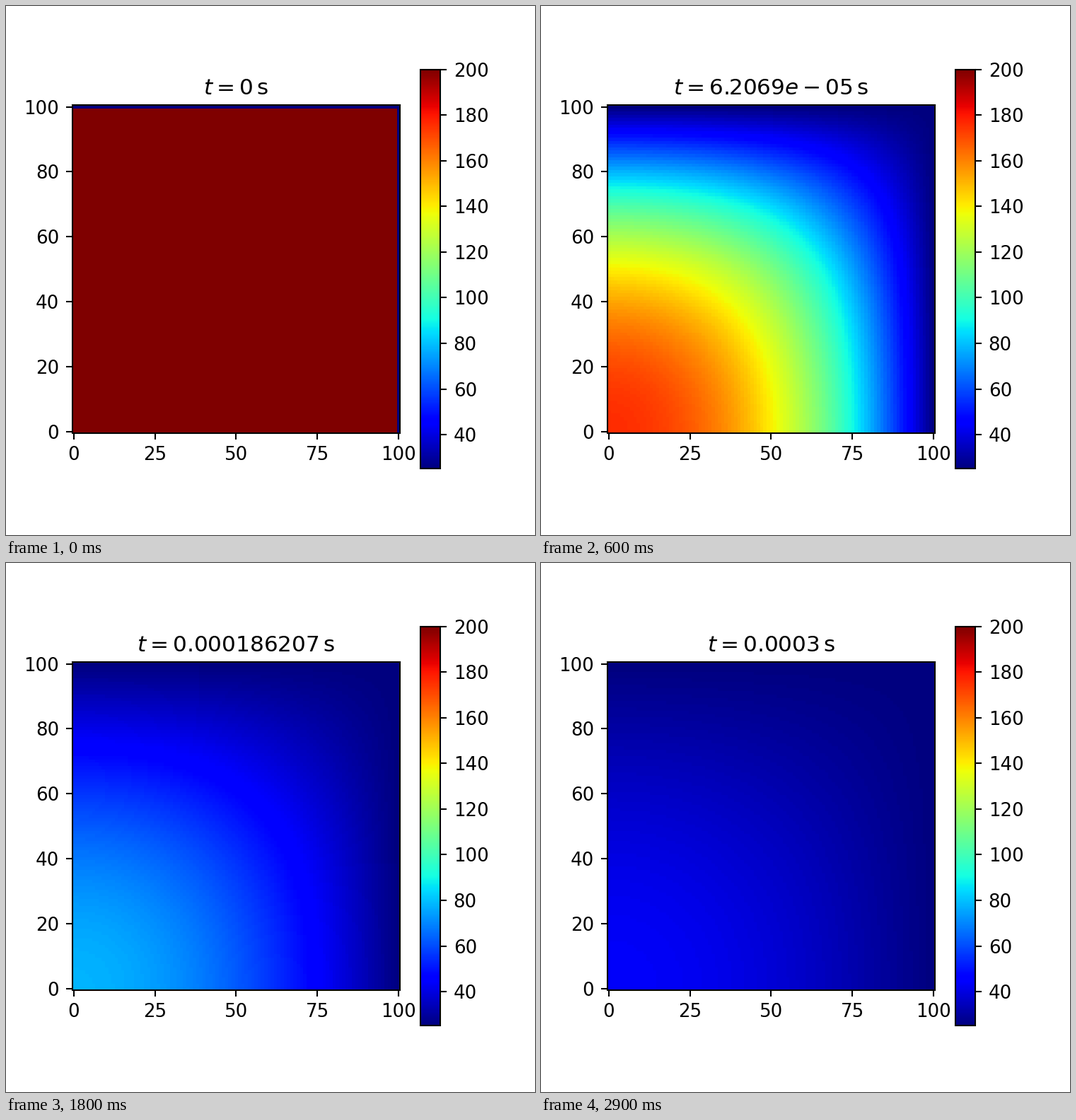
Animation of 748 by 748 pixels, one loop 3 s. Source, as a matplotlib script:

```python
import numpy as np
import matplotlib.pyplot as plt
from matplotlib.animation import FuncAnimation

FRAMES = 30
INTERVAL = 100            # ms
T_END = 3e-4              # s
HOT, COLD = 200, 25
N = 101                   # grid points per side
RATE = 1827               # diffusivity / side length squared, 1/s

x = np.linspace(0, 1, N)
k = np.arange(40)
wave = (2 * k + 1) * np.pi / 2
coef = 2 * (-1.0) ** k / wave
modes = np.cos(np.outer(x, wave))


def profile(t):
    """Cooling of a slab, insulated at x=0 and held cold at x=1."""
    if t == 0:
        p = np.ones(N)
    else:
        p = modes @ (coef * np.exp(-wave ** 2 * RATE * t))
    p[-1] = 0
    return p


def field(t):
    p = profile(t)
    return COLD + (HOT - COLD) * np.outer(p, p)


def title(t):
    return r"$t=%g\,\mathrm{s}$" % t


plt.rcParams["font.family"] = "DejaVu Sans"
fig, ax = plt.subplots(figsize=(4, 4), dpi=187)
fig.subplots_adjust(left=0.125, right=0.9, bottom=0.125, top=0.88)

image = ax.imshow(field(0), cmap="jet", vmin=COLD, vmax=HOT,
                  origin="lower", interpolation="nearest")
ax.set_xticks(range(0, 101, 25))
ax.set_yticks(range(0, 101, 20))
label = ax.set_title(title(0))
fig.colorbar(image, ax=ax, ticks=range(40, 201, 20))


def update(i):
    t = i * T_END / (FRAMES - 1)
    image.set_data(field(t))
    label.set_text(title(t))
    return image, label


anim = FuncAnimation(fig, update, frames=FRAMES, interval=INTERVAL,
                     repeat=True, repeat_delay=0)
plt.show()
```
